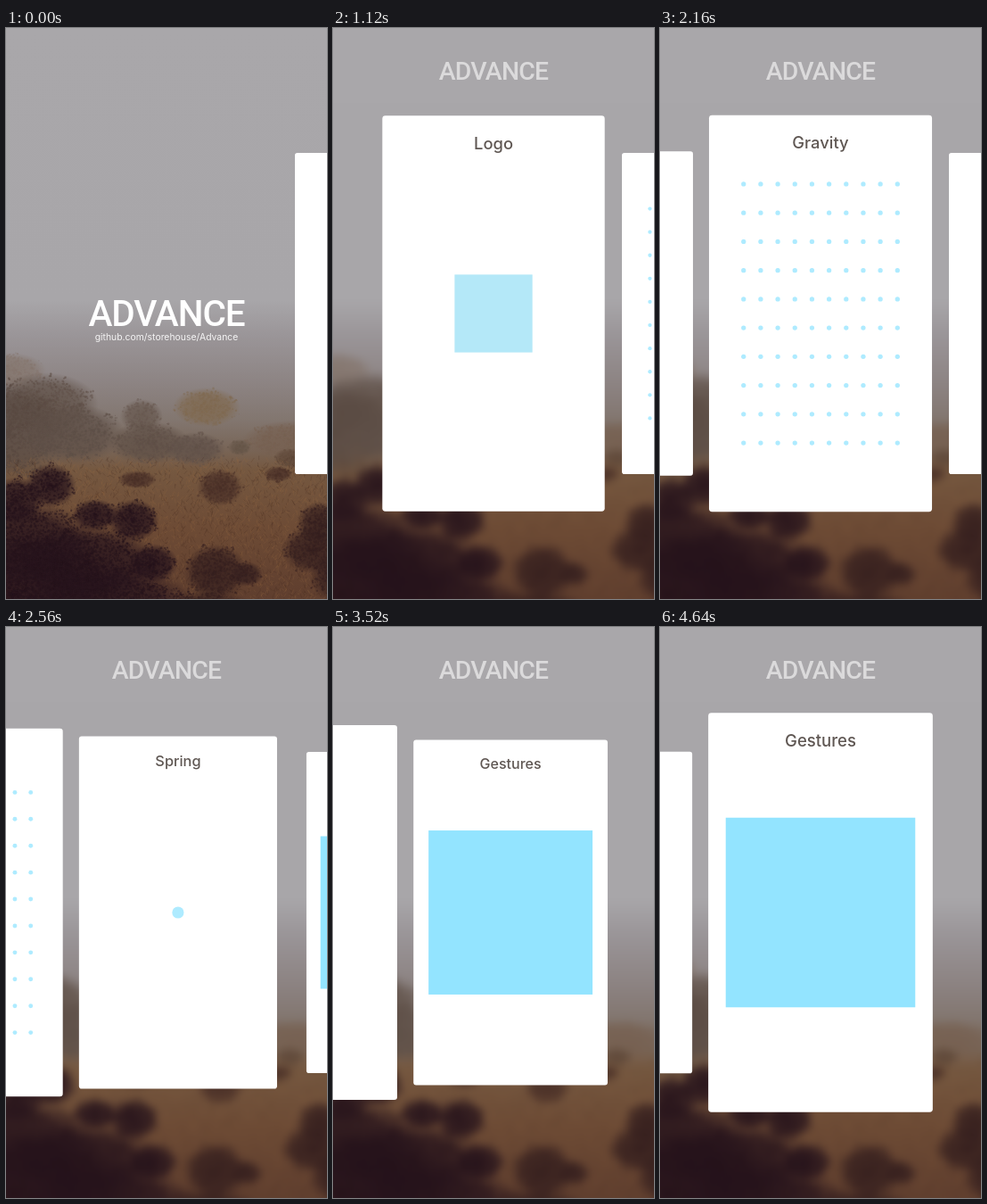
Write an HTML page with a canvas that moves like this. It is 360x640 px and loops after 4720 ms.

```html
<!DOCTYPE html>
<html lang="en">
<head>
<meta charset="utf-8">
<title>Advance</title>
<style>
  html, body { margin: 0; width: 100%; height: 100%; overflow: hidden; background: #a9a7aa; }
  #stage { position: relative; width: 360px; height: 640px; overflow: hidden; }
  #scene { position: absolute; left: -40px; top: -40px; }
  #title, #link { position: absolute; left: 0; width: 360px; text-align: center; color: #fff; white-space: nowrap; }
  #title { top: 296px; font: 500 40.5px/48px Roboto, sans-serif; letter-spacing: -1.1px; }
  #link { top: 339px; font: 10.4px/16px Inter, sans-serif; opacity: .9; }
  .card { position: absolute; left: 0; top: 0; width: 360px; height: 640px; border-radius: 5px; background: #fff; }
  .card h2 { position: absolute; top: 28px; width: 100%; margin: 0; text-align: center;
    font: 500 26.5px/32px Inter, sans-serif; color: #5f5753; }
  .card svg { position: absolute; left: 0; top: 0; }
</style>
</head>
<body>
<div id="stage">
  <canvas id="scene" width="440" height="720"></canvas>
  <div id="title">ADVANCE</div>
  <div id="link">github.com/storehouse/Advance</div>
</div>
<script>
const LOOP = 4720, STEP = 80;
const SPACING = 245.25, SMALL = 0.5625, LARGE = 0.7;
const swipes = [105, 1131, 2170, 3170];   // a page starts to slide in
const focuses = [265, 1238, 2310, 3315];  // it becomes current and grows

const stage = document.getElementById('stage');
const scene = document.getElementById('scene');
const title = document.getElementById('title');
const link = document.getElementById('link');

// Critically damped spring from 0 to 1
const spring = (ms, rate) => {
  const x = Math.max(0, ms) / 1000 * rate;
  return 1 - (1 + x) * Math.exp(-x);
};

let seed = 4711;
const random = () => (seed = seed * 16807 % 2147483647) / 2147483647;
const between = (a, b) => a + (b - a) * random();

function paintScene() {
  const c = scene.getContext('2d');
  c.translate(40, 40);

  const sky = c.createLinearGradient(0, 0, 0, 640);
  [[0, '#a9a7aa'], [305, '#a8a6a9'], [345, '#9a9598'], [400, '#8c8382'], [440, '#82766f'],
   [472, '#786557'], [495, '#755840'], [560, '#6d4b35'], [640, '#5f3e2e']]
    .forEach(([y, color]) => sky.addColorStop(y / 640, color));
  c.fillStyle = sky;
  c.fillRect(-40, -40, 440, 720);

  // Foliage: a soft body with a lumpy fringe of fine leaves
  function bush(x, y, rx, ry, color, density) {
    c.save();
    c.translate(x, y);
    c.scale(rx, ry);
    const body = c.createRadialGradient(0, 0, 0, 0, 0, 1);
    body.addColorStop(0, color + 'd8');
    body.addColorStop(0.65, color + 'b0');
    body.addColorStop(1, color + '00');
    c.fillStyle = body;
    c.fillRect(-1, -1, 2, 2);
    c.restore();

    c.fillStyle = color + '80';
    for (let i = rx * ry * density; i > 0; i--) {
      const a = between(0, 2 * Math.PI);
      const r = Math.pow(random(), 0.65) * (0.9 + 0.14 * Math.sin(7 * a + x));
      c.beginPath();
      c.arc(x + rx * r * Math.cos(a), y + ry * r * Math.sin(a), between(0.5, 1.4), 0, 2 * Math.PI);
      c.fill();
    }
  }

  // Misty trees
  [[5, 384, 40, 20, '#85766d'], [225, 425, 38, 22, '#80694f'], [320, 462, 55, 22, '#776152'],
   [42, 422, 62, 36, '#5f5047'], [0, 452, 70, 55, '#594a42'], [75, 455, 58, 34, '#5e4f47'],
   [152, 435, 24, 19, '#67584f'], [160, 465, 46, 24, '#5f5047'], [212, 472, 34, 19, '#61524a'],
   [262, 470, 13, 9, '#655548'], [318, 482, 18, 11, '#60493a']]
    .forEach(b => bush(...b, 0.35));

  // Dry grass
  c.lineWidth = 0.8;
  for (let i = 0; i < 6500; i++) {
    const x = between(-40, 400), y = between(484, 680);
    c.strokeStyle = random() < 0.55 ? 'rgba(150,108,68,.25)' : 'rgba(60,36,28,.25)';
    c.beginPath();
    c.moveTo(x, y);
    c.lineTo(x + between(-4, 4), y - between(1, 6));
    c.stroke();
  }

  // Distant scrub first, the near dark bushes last
  [[147, 506, 22, 10], [240, 515, 26, 21], [305, 500, 16, 9]].forEach(b => bush(...b, '#4a3028', 0.5));
  [[50, 513, 29, 25], [12, 530, 30, 27], [100, 546, 27, 18], [143, 552, 29, 24], [20, 580, 80, 50],
   [90, 600, 80, 44], [10, 635, 110, 65], [110, 645, 100, 46], [165, 600, 28, 22]]
    .forEach(b => bush(...b, '#26131c', 0.5));
  [[235, 610, 36, 32], [270, 612, 18, 14], [352, 555, 26, 24], [345, 585, 36, 27],
   [378, 615, 38, 32], [225, 655, 60, 24]]
    .forEach(b => bush(...b, '#36201f', 0.5));
}

const circle = (x, y, r) => `<circle cx="${x}" cy="${y}" r="${r}" fill="#aeebff"/>`;
const square = (size, color) =>
  `<rect x="${180 - size / 2}" y="${320 - size / 2}" width="${size}" height="${size}" fill="${color}"/>`;

let dots = '';
for (let i = 0; i < 100; i++)
  dots += circle(180 + (i % 10 - 4.5) * 27.6, 320 + (Math.floor(i / 10) - 4.5) * 46.4, 3.8);

const cards = [
  ['Logo', square(126, '#b4e8f8')],
  ['Gravity', dots],
  ['Spring', circle(180, 320, 10.7)],
  ['Gestures', square(304, '#93e4ff')],
].map(([name, art]) => {
  const card = document.createElement('div');
  card.className = 'card';
  card.innerHTML = `<h2>${name}</h2><svg width="360" height="640">${art}</svg>`;
  return stage.appendChild(card);
});

function render(t) {
  const page = swipes.reduce((sum, start) => sum + spring(t - start, 12), 0);
  const grown = focuses.map(start => spring(t - start, 5.47));

  cards.forEach((card, i) => {
    const focus = grown[i] - (grown[i + 1] || 0);
    const scale = SMALL + (LARGE - SMALL) * focus;
    card.style.transform = `translateX(${SPACING * (i + 1 - page)}px) scale(${scale})`;
  });

  const lift = spring(t - 300, 11);
  title.style.transform = `translateY(${-272 * lift}px) scale(${1 - 0.3 * lift})`;
  title.style.opacity = 1 - 0.42 * lift;
  link.style.opacity = Math.max(0, 0.9 - 1.8 * lift);
  scene.style.filter = `blur(${4.5 * grown[0] ** 2}px)`;
}

paintScene();
const begin = performance.now();
function tick() {
  const t = (performance.now() - begin) % LOOP;
  render(Math.floor(t / STEP) * STEP);
  requestAnimationFrame(tick);
}
tick();
</script>
</body>
</html>
```
